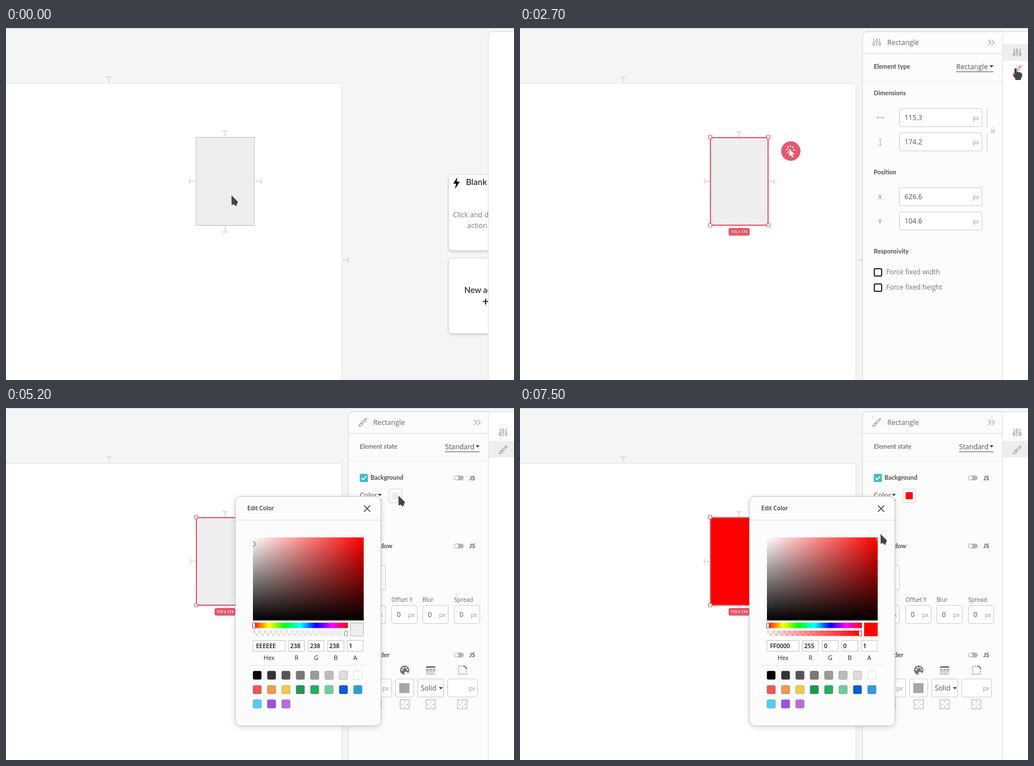
An HTML page for the animation above (8 s loop, 899 px wide and 623 px high).

```html
<!DOCTYPE html>
<html lang="en">
<head>
<meta charset="utf-8">
<title>Editing a rectangle's colour</title>
<style>
  html, body { margin: 0; width: 100%; height: 100%; overflow: hidden; background: #f5f5f5; }
  svg { display: block; width: 899px; height: 623px; }
  text { font-family: "Open Sans", "Noto Sans", sans-serif; white-space: pre; }
  .bold { font-family: Lato, "Open Sans", sans-serif; font-weight: 700; }
  .semi { font-weight: 600; }
  .line { fill: none; }
</style>
</head>
<body>
<script>
const LOOP = 8000, STEP = 100;
const PINK = '#e9566a', TEAL = '#3dbcc8';

// Drawing helpers
const text = (x, y, s, size = 12.2, fill = '#666', more = '') =>
  `<text x="${x}" y="${y}" font-size="${size}" fill="${fill}" ${more}>${s}</text>`;
const bold = (x, y, s, fill = '#4c4c4c', size = 10.9) => text(x, y, s, size, fill, 'class="bold"');
const box = (x, y, w, h, fill = '#fff', stroke = '#ccc', r = 3.5, more = '') =>
  `<rect x="${x + .5}" y="${y + .5}" width="${w}" height="${h}" rx="${r}" fill="${fill}" stroke="${stroke}" ${more}/>`;
const fillBox = (x, y, w, h, fill, r = 0, more = '') =>
  `<rect x="${x}" y="${y}" width="${w}" height="${h}" rx="${r}" fill="${fill}" ${more}/>`;
const line = (d, stroke = '#ccc', width = 1, more = '') =>
  `<path class="line" d="${d}" stroke="${stroke}" stroke-width="${width}" ${more}/>`;
const group = (id, body, more = '') => `<g id="${id}" ${more}>${body}</g>`;
const at = (x, y, body, more = '') => `<g transform="translate(${x} ${y}) ${more}">${body}</g>`;
const caret = (x, y) => `<path d="M${x - 3.5} ${y - 2}h7l-3.5 4z" fill="#444"/>`;

// Icons
const sliders = (x, y, c = '#999') => at(x, y,
  line('M2 0V8M2 12V14M7 0V3M7 7V14M12.5 0V8M12.5 12V14', c, 1.3) +
  [[2, 10], [7, 5], [12.5, 10]].map(([a, b]) => `<circle cx="${a}" cy="${b}" r="1.9" fill="none" stroke="${c}" stroke-width="1.2"/>`).join(''));
const brush = (x, y, id = '') => at(x, y,
  `<path id="${id}" fill="none" stroke="#999" stroke-width="1.2" stroke-linejoin="round"
    d="M14.5.7C13 0 6.5 6 5.2 8.4L7 10.2C9.5 8.8 15.3 2 14.5.7ZM4.7 8.8C2.2 9 3 11.5.6 13.8C4 14.6 6.6 13.2 6.6 10.7Z"/>`);
const tick = (x, y, turn) => at(x, y, line('M0-1V-11M-5-11H5', '#dcdcdc', 2), `rotate(${turn})`);

// Form parts
const field = (x, y, w, value, unitX) =>
  box(x, y, w, 32) + text(x + 9.5, y + 21, value, 12.2, '#555') + text(unitX, y + 21, 'px', 10.3, '#999');
const option = (x, y, s, width, arrowX) =>
  text(x, y, s, 12.3, '#555') + line(`M${x} ${y + 4.5}h${width}`, '#555') + caret(arrowX, y - 5);
const section = (y, name) =>
  fillBox(626, y, 14.5, 14.5, TEAL, 2.5) + line(`M629 ${y + 7.3}l3 3 5.5-6`, '#fff', 2) +
  bold(645, y + 10.7, name) +
  fillBox(793, y + 3, 17, 8.5, '#b4b4b4', 4.2) + `<circle cx="797.4" cy="${y + 7.2}" r="3.1" fill="#fff"/>` +
  bold(820, y + 11, 'JS', '#555', 10.5);
const checkbox = (y, label) =>
  box(626.5, y + .5, 13, 13, '#fff', '#222', 2, 'stroke-width="2"') + text(648, y + 11, label, 12, '#777');

const panelHead = icon => icon + text(650, 30, 'Rectangle', 12.3, '#666') +
  line('M828.5 21l5 4.6-5 4.6M834.5 21l5 4.6-5 4.6', '#aaa', 1.3);

const layoutPanel = () => panelHead(sliders(624, 18, '#aaa')) +
  bold(626, 72, 'Element type') + option(772, 73, 'Rectangle', 66, 834.5) +
  bold(626, 119, 'Dimensions') +
  line('M631.500 158.500H644M634 156l-2.500 2.500 2.500 2.500M641.500 156l2.500 2.500-2.500 2.500', '#aaa') +
  line('M637.500 196V208M635 196.500h5M635 207.500h5', '#aaa') +
  field(671, 142, 146, '115.3', 801) + field(671, 185, 146, '174.2', 801) +
  line('M826.500 142V175M826.500 185V218') +
  fillBox(833, 180, 8, 6, '#d8d8d8', 1) + line('M835 180v-2a2 2 0 0 1 4 0v2', '#d8d8d8', 1.2) +
  bold(626, 259, 'Position') +
  text(634, 303, 'X', 11, '#777') + field(671, 282, 146, '626.6', 801) +
  text(634, 346, 'Y', 11, '#777') + field(671, 325, 146, '104.6', 801) +
  bold(626, 399, 'Responsivity') +
  checkbox(425, 'Force fixed width') + checkbox(452, 'Force fixed height');

const offsets = () => ['Offset X', 'Offset Y', 'Blur', 'Spread'].map((name, i) => {
  const x = 626 + Math.round(i * 55.5);
  return text(x, 343, name, 10.2, '#666') + field(x, 349, 45, '0', x + 29.5);
}).join('');

const dice = x => box(x, 516, 16, 16, '#fff', '#aaa', 0) +
  [[4, 8.5], [8.5, 4], [13, 8.5], [8.5, 13]].map(([a, b]) => fillBox(x + a - .8, 516 + b - .8, 1.6, 1.6, '#888')).join('');

const palette = () => '<circle cx="705.5" cy="464" r="8.300" fill="#777"/>' +
  [[701, 463], [703.5, 459.5], [708, 459.5], [710.5, 463], [708, 470]].map(([x, y], i) =>
    `<circle cx="${x}" cy="${y}" r="${i < 4 ? 1.5 : 3}" fill="#fcfcfc"/>`).join('');

const stylePanel = () => panelHead(brush(623.5, 18)) +
  bold(626, 72, 'Element state', '#777') + option(777, 73, 'Standard', 61, 834.5) +
  section(116.5, 'Background') + option(626, 159, 'Color', 39, 661.500) +
  box(677, 143, 23, 24) + fillBox(682.5, 149, 12.5, 12.500, '#eee', 0, 'class="paint"') +
  section(237, 'Shadow') + text(626, 271.5, 'Color', 10, '#666') +
  box(626, 278, 45, 43) + fillBox(633.5, 286, 30.5, 28.500, '#d6d6d6') + offsets() +
  section(430, 'Border') +
  line('M648 458h16M648 462h16', '#777', 2) + line('M648 466.500h16', '#777', 3) + line('M648 470.500h16', '#777', 1.5) +
  palette() +
  line('M743.500 458.500h16', '#777', 3) + line('M743.500 463.500h16', '#777', 2, 'stroke-dasharray="4.500 1.300"') +
  line('M743.500 467h16M743.500 470.500h16', '#777', 1.6, 'stroke-dasharray="2.500 1.200"') +
  line('M801 472V457H809', '#888', 1.5, 'stroke-dasharray="2 1.800"') + line('M809 457q6 0 6 6', '#777', 2) +
  line('M815 465V471H801', '#888', 1.5, 'stroke-dasharray="2 1.800"') +
  field(629, 479, 53, '1', 666) + box(689, 479, 32, 32) + fillBox(696, 487, 18, 17.500, '#a6a6a6') +
  box(728, 479, 46, 32, '#fcfcfc', '#ccc', 1) + text(734, 500, 'Solid', 12.2, '#555') + caret(769.5, 496) +
  field(781, 479, 53, '', 819) + [647.5, 697, 743, 799].map(dice).join('');

// Canvas
const actionCards = () =>
  box(783, 259, 150, 134, '#fff', '#ddd', 6, 'filter="url(#soft)"') +
  box(783, 407, 150, 133, '#fff', '#ddd', 6, 'filter="url(#soft)"') +
  '<path d="M799 264l-7.500 11.500h5l-2 9.500 8.500-13h-5.500z" fill="#000"/>' +
  bold(814, 278, 'Blank action', '#444', 14.8) +
  text(791, 335, 'Click and drag', 12.5, '#777') + text(816, 354, 'action', 12.5, '#777') +
  bold(811, 469, 'New action', '#444', 14.5) + line('M843.500 484h10.500M848.800 479v10.500', '#000', 1.6);

const rectTicks = inset => tick(387.500, 193 + inset, 0) + tick(440.500 - inset, 271.500, 90) +
  tick(388, 350 - inset, 180) + tick(336 + inset, 271.500, 270);

const corners = (x0, x1, y0, y1, shape) => [[x0, y0], [x1, y0], [x0, y1], [x1, y1]].map(([x, y]) => shape(x, y)).join('');

const burst = () => {
  let rays = '';
  for (let k = 2; k < 9; k++) {
    const a = k * Math.PI / 4 - .1 + Math.PI / 8 * .3;
    const p = r => `${(478.5 + r * Math.cos(a)).toFixed(1)} ${(215.5 + r * Math.sin(a)).toFixed(1)}`;
    rays += `M${p(4.5)}L${p(8.3)}`;
  }
  return `<circle cx="479.2" cy="217.800" r="17.200" fill="${PINK}"/>` + line(rays, '#fff', 1.7) +
    '<path d="M476.500 213.500V227l3-2.500 2.200 5 2.400-1-2.200-5h4z" fill="#fff"/>';
};

const selection = () => rectTicks(1.4) +
  fillBox(337, 194, 102, 155, '#eee', 0, `class="paint" stroke="${PINK}" stroke-width="2"`) +
  corners(336.5, 439.5, 193, 349, (x, y) => box(x - 3.5, y - 3.5, 6, 6, '#fff', PINK, .5, 'stroke-width="1.200"')) +
  group('radii', corners(347, 428.5, 204.3, 338.500, (x, y) =>
    `<circle cx="${x}" cy="${y}" r="4.600" fill="#fff" stroke="${PINK}" stroke-width="1.200"/>`)) +
  fillBox(369, 354, 37.500, 13.500, PINK, 3.500) +
  text(387.700, 363.300, '115 x 174', 6.7, '#fff', 'class="semi" text-anchor="middle"') + burst();

// Colour dialog
const SWATCHES = ['#000', '#333', '#555', '#777', '#999', '#bbb', '#ddd', '#fff',
  '#eb5757', '#f2994a', '#f2c94c', '#219653', '#27ae60', '#6fcf97', '#0b5bd9', '#2d9cdb',
  '#56ccf2', '#9b51e0', '#bb6bd9'];
const AREA = { x: 437, y: 229, w: 196, h: 147 };
const FIELDS = [['Hex', 437, 57], ['R', 500, 28], ['G', 535, 28], ['B', 569, 29], ['A', 604, 28]];
const areaFill = paint => fillBox(AREA.x, AREA.y, AREA.w, AREA.h, paint);

const dialog = () =>
  box(405.5, 156, 257.500, 406, '#fcfcfc', '#c4c4c4', 10, 'filter="url(#lift)"') +
  text(427, 181, 'Edit Color', 10.1, '#333', 'class="semi"') +
  line('M633.500 172.500l11 11M644.500 172.500l-11 11', '#444', 1.7) + line('M406 198.500H663', '#ddd') +
  areaFill('#f00') + areaFill('url(#tint)') + areaFill('url(#shade)') +
  `<g clip-path="url(#area)"><g id="marker"><circle r="4" fill="none" stroke="#333"/><circle r="3" fill="none" stroke="#fff"/></g></g>` +
  fillBox(437, 380, 168, 9.5, 'url(#hue)') + fillBox(437, 394, 168, 9.5, 'url(#checks)') + fillBox(437, 394, 168, 9.5, 'url(#alpha)') +
  box(436, 380, 4.500, 9, '#fff', '#c22', 1) + box(599, 394, 5, 9, '#fff', '#888', 1.500, 'id="alphaKnob"') +
  box(609, 380, 23, 23, '#eee', '#bbb', 0, 'id="preview" class="paint"') +
  FIELDS.map(([name, x, w], i) => box(x - .5, 411, w, 19, '#fff', '#c4c4c4', 0) +
    text(x + (i ? 3 : 5.500), 425, '', 10.5, '#111', `class="semi" id="value${i}"`) +
    text(x + w / 2, 445.500, name, 10.8, '#222', 'text-anchor="middle"')).join('') +
  line('M427 455.500H642', '#e8e8e8') +
  SWATCHES.map((c, i) => box(436.5 + i % 8 * 25.45, 465 + (i >> 3) * 25.4, 15, 15, c, i === 7 ? '#ddd' : 'rgba(0,0,0,.2)', 2.500)).join('');

const arrow = '<path d="M0 0L11.500 11.500 8 19.800 4.200 16 .3 17.500Z" fill="#444" stroke="#fff" stroke-width="1.200" stroke-opacity=".75" paint-order="stroke"/>';
const hand = `<path d="M-2 1.500Q0-1.500 2 1.500V7Q4 5.500 5.500 7.300 7.500 6.300 8.500 8.300 11.500 7.800 11.500 11V15L9.500 18V21H-.5V18.500L-5 12.500Q-4.500 9.500-2 11.500Z"
  fill="#444" stroke="#fff" stroke-width="1.200" paint-order="stroke"/>`;

const stops = list => list.map(([o, c, a = 1]) => `<stop offset="${o}" stop-color="${c}" stop-opacity="${a}"/>`).join('');
const gradient = (id, list, more = '') => `<linearGradient id="${id}" ${more}>${stops(list)}</linearGradient>`;
const shadow = (id, dy, blur, a) => `<filter id="${id}" x="-20%" y="-20%" width="140%" height="140%">
  <feDropShadow dx="0" dy="${dy}" stdDeviation="${blur}" flood-opacity="${a}"/></filter>`;
const defs = `<defs>
  ${shadow('soft', 2, 2, .16)}${shadow('lift', 2, 5, .16)}${shadow('paper', 0, 1.500, .14)}
  ${gradient('tint', [[0, '#fff'], [1, '#fff', 0]])}
  ${gradient('shade', [[0, '#000', 0], [1, '#000']], 'x2="0" y2="1"')}
  ${gradient('hue', ['#f00', '#ff0', '#0f0', '#0ff', '#00f', '#f0f', '#f00'].map((c, i) => [i / 6, c]))}
  <linearGradient id="alpha"><stop class="tone" offset="0" stop-opacity="0"/><stop class="tone" offset="1"/></linearGradient>
  <pattern id="checks" x="437" y="394" width="9.500" height="9.500" patternUnits="userSpaceOnUse">
    <path d="M0 0H9.500V9.500H0Z" fill="#fff"/><path d="M0 0H4.750V9.500H9.500V4.750H0Z" fill="#dcdcdc"/></pattern>
  <clipPath id="area">${areaFill('#000')}</clipPath></defs>`;

document.body.innerHTML = `<svg viewBox="0 0 899 623">${defs}
  ${fillBox(0, 0, 899, 623, '#f5f5f5')}${fillBox(0, 0, 899, 1, '#d2d2d2')}
  ${tick(182.500, 97.500, 0)}${tick(595, 411, 90)}
  ${fillBox(-10, 99, 603.500, 540, '#fff', 0, 'filter="url(#paper)"')}
  ${group('plain', rectTicks(0) + box(336, 193, 103, 156, '#eee', '#bdbdbd', 0))}
  ${group('selected', selection())}
  ${actionCards()}
  ${group('panel', box(605.5, 6, 320, 640, '#fcfcfc', '#d2d2d2', 9) +
    line('M606 45H900', '#d8d8d8') + line('M606 94.500H900', '#e8e8e8') +
    group('layout', layoutPanel()) + group('style', stylePanel()))}
  ${box(853, 6, 80, 640, '#fff', '#ddd', 8)}
  ${group('tabs', fillBox(853.5, 28, 46, 30, '#eee', 0, 'id="activeTab"') + sliders(872.5, 36) + brush(872, 66.5, 'brushTab'))}
  ${group('dialog', dialog())}
  ${group('tip', fillBox(838, 95, 59, 34, '#3c3c3c', 4) + text(867.500, 116, 'Style', 12, '#fff', 'text-anchor="middle"'))}
  ${group('cursor', group('arrow', arrow) + group('hand', hand))}
</svg>`;

// Timeline: [time, x, y, eased]
const PATH = [
  [0, 399, 296], [300, 401, 306], [900, 401, 306], [1700, 866, 72, true], [1800, 866, 72],
  [1900, 876, 72], [2000, 877, 71], [3200, 877, 71], [3600, 717, 110], [3800, 694, 138],
  [4100, 681, 168], [4500, 678, 196], [4800, 694.5, 155], [5500, 694.5, 155], [6000, 645, 208],
  [6300, 587, 327], [6400, 587, 327], [6500, 621, 236], [7000, 621, 236], [7500, 638, 223], [LOOP, 638, 223]
];
const $ = id => document.getElementById(id);
const show = (id, on) => { $(id).style.display = on ? '' : 'none'; };
const clamp = v => Math.min(1, Math.max(0, v));

function cursorAt(t) {
  const i = PATH.findIndex(p => p[0] > t);
  const [t0, x0, y0] = PATH[i - 1], [t1, x1, y1, eased] = PATH[i];
  let k = (t - t0) / (t1 - t0);
  if (eased) k = k * k * (3 - 2 * k);
  return [x0 + (x1 - x0) * k, y0 + (y1 - y0) * k];
}

function paintColor(sat, val) {
  const high = Math.round(255 * val), low = Math.round(255 * val * (1 - sat));
  const hex = [high, low, low].map(v => v.toString(16).padStart(2, '0')).join('').toUpperCase();
  document.querySelectorAll('.paint').forEach(el => el.setAttribute('fill', '#' + hex));
  document.querySelectorAll('.tone').forEach(el => el.setAttribute('stop-color', '#' + hex));
  $('preview').setAttribute('stroke', sat ? '#' + hex : '#bbb');
  $('alphaKnob').setAttribute('stroke', sat ? '#d22' : '#888');
  [hex, high, low, low, 1].forEach((v, i) => { $('value' + i).textContent = v; });
  $('marker').setAttribute('transform', `translate(${AREA.x + sat * AREA.w} ${AREA.y + (1 - val) * AREA.h + 1.800})`);
}

function render(t) {
  const [x, y] = cursorAt(t);
  const pointing = t >= 1900 && t < 3300, styling = t >= 3000;
  $('cursor').setAttribute('transform', `translate(${x} ${y})`);
  show('arrow', !pointing);
  show('hand', pointing);
  show('plain', t < 500);
  show('selected', t >= 500);
  show('radii', x < 439);
  show('tabs', t >= 500);
  show('panel', t >= 700);
  $('panel').setAttribute('transform', `translate(${t < 800 ? 35 : 0} 0)`);
  show('layout', !styling);
  show('style', styling);
  $('activeTab').setAttribute('y', styling ? 58 : 28);
  $('brushTab').setAttribute('stroke', pointing ? PINK : '#999');
  show('tip', t >= 2500 && t < 2700);
  show('dialog', t >= 5200);
  if (t >= 7100) paintColor(clamp((x - AREA.x) / AREA.w), clamp(1 - (y - AREA.y) / AREA.h));
  else paintColor(0, 238 / 255);
}

const start = performance.now();
let last = -1;
function loop() {
  const t = Math.floor((performance.now() - start) % LOOP / STEP) * STEP;
  if (t !== last) render(last = t);
  requestAnimationFrame(loop);
}
loop();
</script>
</body>
</html>
```
